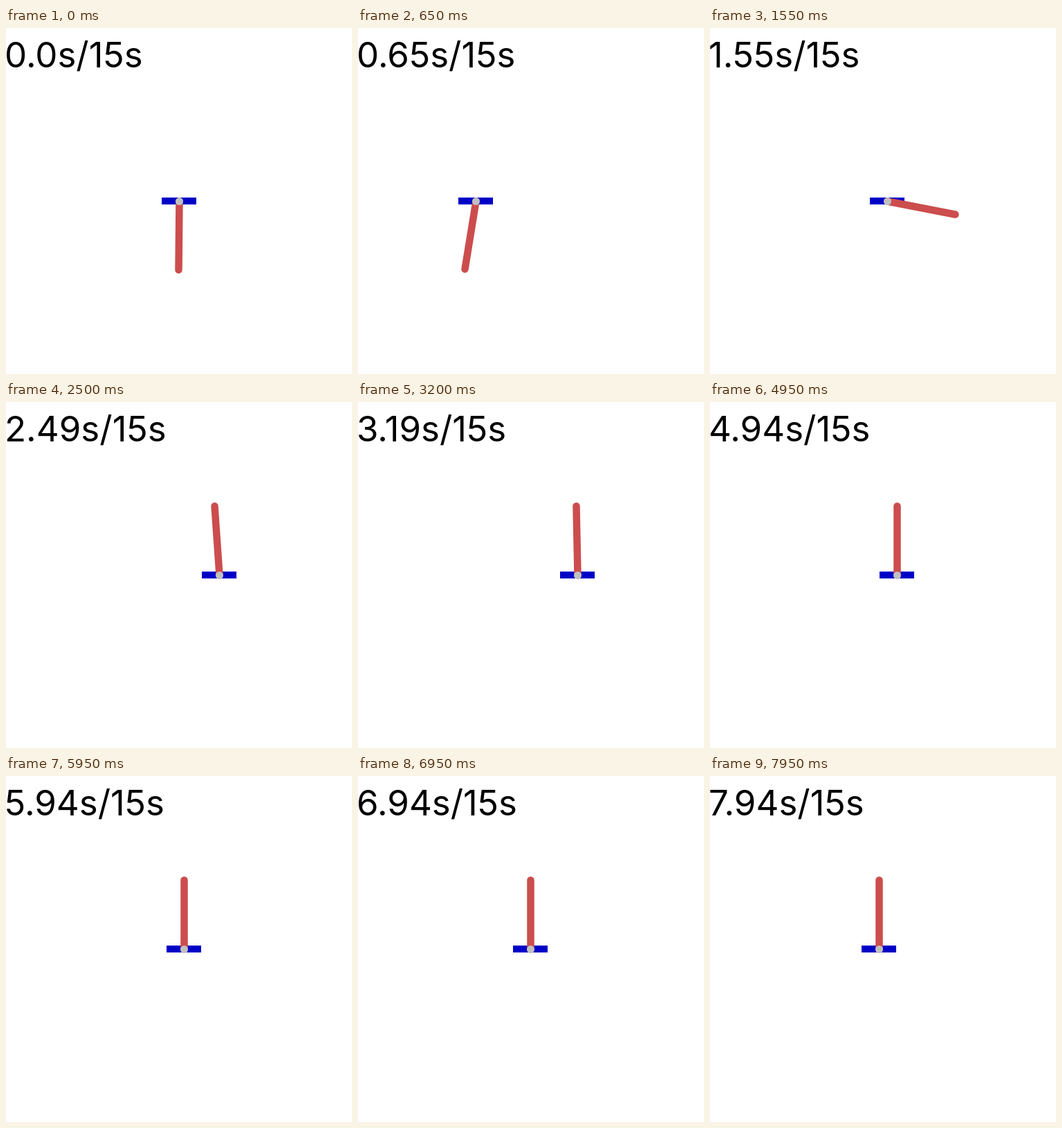
Recreate the animation shown at these times as an HTML page with a canvas. Size 500x500 px, loop 8 s.

```html
<!DOCTYPE html>
<html lang="en">
<head>
<meta charset="utf-8">
<title>Cart-pole swing-up</title>
<style>
  html, body { margin: 0; width: 100%; height: 100%; overflow: hidden; background: #fff; }
  canvas { display: block; }
</style>
</head>
<body>
<canvas id="stage" width="500" height="500"></canvas>
<script>
const ctx = document.getElementById("stage").getContext("2d");
const LOOP = 8000, STEP = 50, RAIL_Y = 250, POLE = 100;
const BALANCE_TIME = 2.5, CATCH_TIME = 1.55;

// Pushes that swing the pole up: end in seconds, acceleration in px/s²
const PUSH = 655;
const pushes = [
  { end: .35, accel: -PUSH },
  { end: 1.072, accel: PUSH },
  { end: 1.6, accel: -PUSH },
  { end: 1.97, accel: PUSH },
  { end: BALANCE_TIME, accel: -180 }
];

// Oscillation that starts at 1 and dies away
const damped = (t, decay, frequency) => Math.exp(-decay * t) * Math.cos(frequency * t);

function cartX(t) {
  if (t >= BALANCE_TIME) {
    const s = t - BALANCE_TIME;
    return 236.7 + 112.8 * Math.exp(-.49 * s) - 41 * damped(s, 2, 2.3);
  }
  let x = 250, speed = 0, begin = 0;
  for (const { end, accel } of pushes) {
    const dt = Math.min(t, end) - begin;
    x += speed * dt + accel * dt * dt / 2;
    speed += accel * dt;
    if (t <= end) break;
    begin = end;
  }
  return x;
}

// Half a pendulum swing between two resting angles
function swing(t, begin, end, from, to) {
  return from + (to - from) * (1 - Math.cos(Math.PI * (t - begin) / (end - begin))) / 2;
}

// Degrees from hanging straight down, positive to the right
function poleAngle(t) {
  if (t < .38) return swing(t, 0, .38, -.2, 33);
  if (t < 1.05) return swing(t, .38, 1.05, 33, -88);
  if (t < CATCH_TIME) return swing(t, 1.05, 1.717, -88, 107.6);
  return 180 - 101 * damped(t - CATCH_TIME, 2.66, 2.2);
}

// The clock adds up floating-point steps and cuts the digits off unrounded
function clockText(steps) {
  let t = 0;
  for (let i = 0; i < steps; i++) t += .05;
  const digits = Number.isInteger(t) ? t.toFixed(1) : String(t).slice(0, 4);
  return digits + "s/15s";
}

const pixel = v => Math.floor(v + 1e-6) + .5;

function draw(now) {
  const step = Math.floor(now % LOOP / STEP), t = step * STEP / 1000;
  const cart = cartX(t), angle = poleAngle(t) * Math.PI / 180;
  const x = pixel(cart), y = pixel(RAIL_Y);

  ctx.fillStyle = "#fff";
  ctx.fillRect(0, 0, 500, 500);

  ctx.fillStyle = "#000";
  ctx.font = "51px Inter, 'Open Sans', sans-serif";
  ctx.fillText(clockText(step), -2, 57);

  ctx.fillStyle = "#0000c8";
  ctx.fillRect(x - 25.5, RAIL_Y - 5, 50, 10);

  ctx.strokeStyle = "#cc4d4d";
  ctx.lineWidth = 10.5;
  ctx.lineCap = "round";
  ctx.beginPath();
  ctx.moveTo(x, y);
  ctx.lineTo(pixel(cart + POLE * Math.sin(angle)), pixel(RAIL_Y + POLE * Math.cos(angle)));
  ctx.stroke();

  ctx.fillStyle = "#c0c0c0";
  ctx.beginPath();
  ctx.arc(x, y, 5.5, 0, 2 * Math.PI);
  ctx.fill();
}

const start = performance.now();
function tick() {
  draw(performance.now() - start);
  requestAnimationFrame(tick);
}
tick();
</script>
</body>
</html>
```
